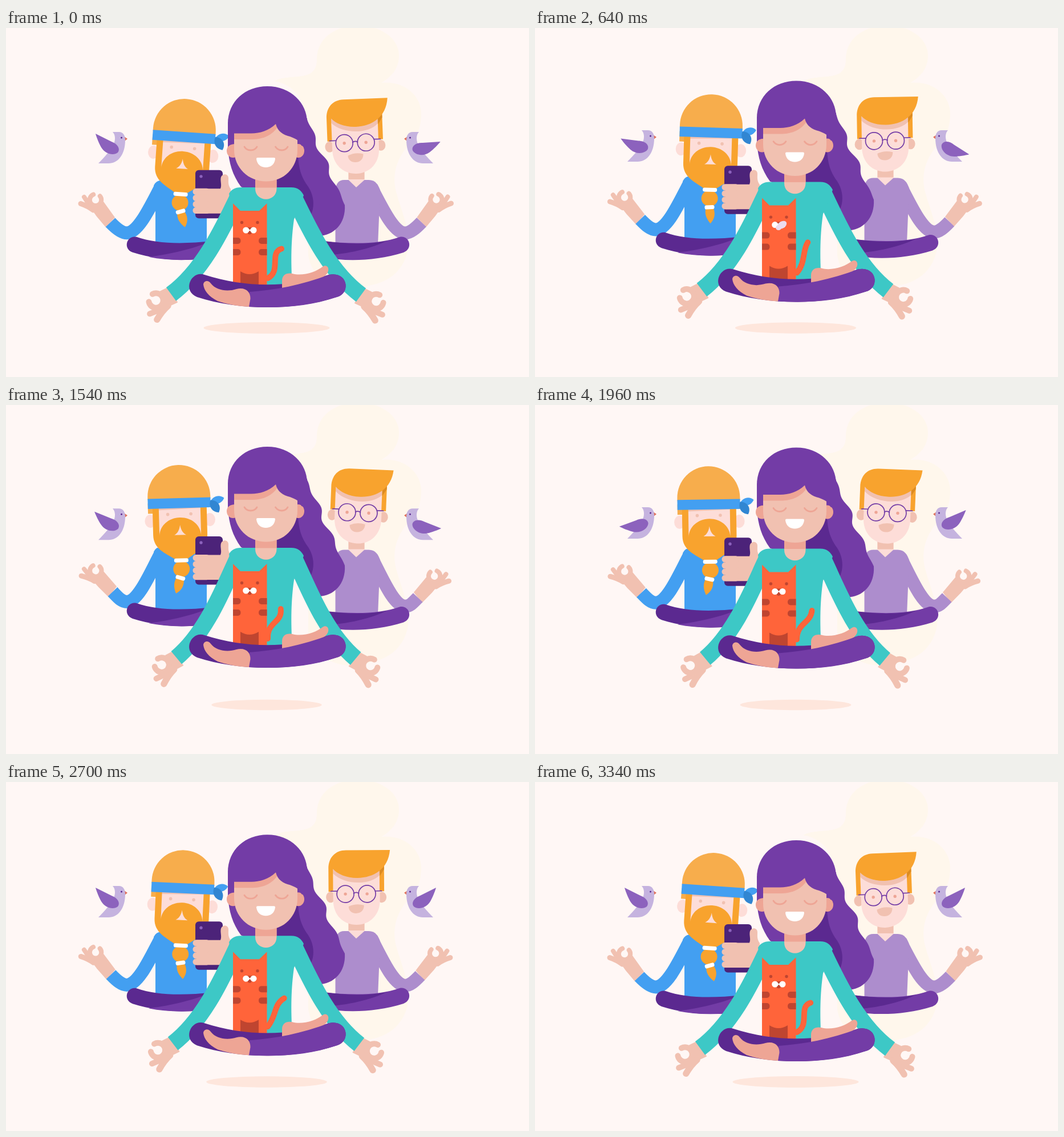
Recreate the animation shown at these times as an HTML page with a canvas. Size 917x611 px, loop 3360 ms.

```html
<!DOCTYPE html>
<html lang="en">
<head>
<meta charset="utf-8">
<title>Floating meditation</title>
<style>
  html, body { margin: 0; width: 100%; height: 100%; overflow: hidden; background: #fff7f5; }
  canvas { display: block; }
</style>
</head>
<body>
<canvas id="stage" width="917" height="611"></canvas>
<script>
const ctx = document.getElementById('stage').getContext('2d');
const LOOP = 3360, TAU = Math.PI * 2;
const C = {
  bg: '#fff7f5', cream: '#fff7ec', shadow: '#fee6dc', white: '#ffffff',
  skin: '#f1c1b1', blush: '#eea595', pale: '#fdddd8',
  purple: '#733ca6', deep: '#5b2990', phone: '#4c2379', violet: '#8c62bd',
  lilac: '#c5b3df', lavender: '#ad8dcd', teal: '#3dc8c6',
  blue: '#439ff1', navy: '#3186d2', orange: '#f8a32e', amber: '#f7ad4c', rust: '#dc8b22',
  cat: '#ff643a', brown: '#bf4530', tongue: '#ecdcee'
};

const fill = (color, d) => { ctx.fillStyle = color; ctx.fill(new Path2D(d)); };
const line = (color, width, d, cap = 'round') => {
  ctx.strokeStyle = color;
  ctx.lineWidth = width;
  ctx.lineCap = cap;
  ctx.lineJoin = 'round';
  ctx.stroke(new Path2D(d));
};
const oval = (color, x, y, rx, ry = rx, turn = 0) => {
  ctx.fillStyle = color;
  ctx.beginPath();
  ctx.ellipse(x, y, rx, ry, turn, 0, TAU);
  ctx.fill();
};
const box = (color, x, y, w, h, r = 0) => {
  ctx.fillStyle = color;
  ctx.beginPath();
  ctx.roundRect(x, y, w, h, r);
  ctx.fill();
};
const rotate = deg => ctx.rotate(deg * Math.PI / 180);
const group = draw => { ctx.save(); draw(); ctx.restore(); };
const moved = (x, y, draw) => group(() => { ctx.translate(x, y); draw(); });
const turned = (x, y, deg, draw) => group(() => {
  ctx.translate(x, y); rotate(deg); ctx.translate(-x, -y); draw();
});
const mirrored = (width, draw) => group(() => {
  ctx.translate(width, 0); ctx.scale(-1, 1); draw();
});

// 0 at the lowest point, 1 at the highest
const rise = t => (1 - Math.cos(TAU * t / LOOP)) / 2;

// Hand with thumb and index curled into a ring; reach is the length of bare forearm
function hand(cuffX, cuffY, sway, ringX, ringY, { angle = 0, scale = 1, reach = 1 } = {}) {
  group(() => {
    ctx.translate(cuffX, cuffY);
    rotate(sway);
    ctx.translate(ringX, ringY);
    rotate(angle);
    ctx.scale(scale, scale);
    fill(C.skin, `M-13 8 L2 29 L${2 + 16 * reach} ${29 + 19 * reach} L${20 + 14 * reach} ${11 + 20 * reach} L14 3 L10 5 A11 11 0 0 1 -9 6 Z`);
    line(C.skin, 8, 'M-9 12 L-20 -5');
    line(C.skin, 9, 'M-4 18 Q-13 11 -26 6.5');
    ctx.lineWidth = 8;
    ctx.beginPath();
    ctx.arc(0, 0, 10.2, -0.7, -1.95);
    ctx.stroke();
  });
}

function bird(t, lag) {
  // start, period and number of flaps
  const bursts = [[-58, 290, 4], [1189, 264, 4], [2720, 235, 2]];
  let wave = 1;
  for (const [start, period, count] of bursts) {
    const turns = (t - start - lag) / period;
    if (turns > 0 && turns < count) wave = Math.cos(TAU * turns);
  }
  const bob = t < 2640 ? -1.5 * (1 - Math.cos(TAU * t / 1320)) : 0;
  moved(0, bob, () => {
    fill('#e0705a', 'M207 190 L213 194 L208 198 Z');
    fill(C.lilac, 'M187 182 H198 C206 182 209 189 209 196 C209 222 196 237 180 237 H162 C172 227 185 213 190 200 C192 193 191 186 187 182 Z');
    oval(C.deep, 202.5, 192, 1.5);
    turned(188, 211, -32 * (1 - wave), () => {
      fill(C.violet, 'M157 185 L185 199 C196 203 201 212 196 218 C189 224 174 221 167 209 C163 202 159 192 157 185 Z');
    });
  });
}

function raisedArm(color, x, y, elbow, sway) {
  hand(x, y, sway, -26, -39.5);
  line(color, 23, `M271 279 C252 315 232 ${elbow - 1} 212 ${elbow} C203 ${elbow} ${x + 10} ${y + 10.5} ${x} ${y}`, 'butt');
}

function rightMan(t) {
  const p = rise(t - 60);
  moved(0, -13 * p, () => {
    mirrored(911.5, () => raisedArm(C.lavender, 183 + 6.5 * p, 340 + 10 * p, 359 + 6 * p, -4.5 * p));
    fill(C.lavender, 'M593 266 H636 C648 266 653 275 656 284 L652 380 H577.5 V285 C578 273 583 266 593 266 Z');
    fill(C.purple, 'M690 366 C657 378 609 379 557 373 V402 C599 409 649 408 697 393 C715 386 707 362 690 366 Z');
    fill(C.deep, 'M557 373 C600 379 640 379 668 372.5 C640 386 600 396 557 398 Z');
    fill(C.pale, 'M600.5 245 H628.5 V266 L614 279 L600.5 266 Z');
    box(C.skin, 600.5, 248, 28, 17);
    turned(614, 262, -2.2 + 4.7 * p, () => {
      oval(C.skin, 569.5, 206.5, 8, 9.5);
      oval(C.skin, 659.5, 207, 8, 9.5);
      fill(C.pale, 'M574 150 H656 V212 C656 238 638 255 615 255 C592 255 574 238 574 212 Z');
      fill(C.skin, 'M574 152 H656 V168 C640 186 595 186 574 165 Z');
      box(C.orange, 655.5, 145, 8, 51.5);
      fill(C.rust, 'M656 148 H663.5 V158 L656 170 Z');
      fill(C.orange, 'M566 197 V157 C566 137 578 124.5 597 124.5 H674 C671 158 645 173 617 173 C597 173 582 166 574 157 V197 Z');
      for (const x of [595.5, 633.5]) {
        oval(C.blush, x, 201, 2.7);
        ctx.strokeStyle = C.purple;
        ctx.lineWidth = 1.7;
        ctx.beginPath();
        ctx.arc(x, 201, 15, 0, TAU);
        ctx.stroke();
      }
      line(C.purple, 1.7, 'M610 200 Q614.5 197 619 200 M570 196 H581 M648 196 H659');
      fill(C.skin, 'M601 223 Q614 217 628 221 C628 230 622 235 614 235 C606 235 601 230 601 223 Z');
    });
  });
}

function leftMan(t) {
  const p = rise(t + 100);
  moved(0, -19 * p, () => {
    raisedArm(C.blue, 183 + 4 * p, 340.5 + 5.5 * p, 359 + 4.5 * p, -5.5 * p);
    fill(C.blue, 'M262 380 V290 L259 276 Q263 267 273 267 H340 L352 280 V380 Z');
    fill(C.deep, 'M229 366 C262 378 310 379 362 373 V402 C320 409 270 408 222 393 C204 386 212 362 229 366 Z');
    fill(C.purple, 'M250 401 C290 396 330 386 356 375 H362 V402 C325 408 285 408 250 401 Z');

    turned(307, 278, 4 - 5.6 * p, () => {
      oval(C.pale, 254.5, 221, 9.5, 11.5);
      oval(C.pale, 359, 221, 9.5, 11.5);
      box(C.amber, 251, 190, 10, 18);
      box(C.pale, 266, 196, 82, 72);
      fill(C.skin, 'M269 198 H344 V200 L269 202.5 Z');
      oval(C.skin, 285.5, 210, 2.8);
      oval(C.skin, 326, 210, 2.8);
      fill(C.orange, 'M259 198 H270 V247 C271 229 287 216 306.5 216 C326 216 342 229 343 247 V198 H354 V246 C354 270 334 277 319 288 H295 C280 278 259 270 259 246 Z');
      fill(C.pale, 'M306.5 229 C308 239 312 244 317 246.5 H296 C301 244 305 239 306.5 229 Z');
      fill(C.amber, 'M251 184 V179 A55 55 0 0 1 361 179 V184 Z');
      box(C.blue, 251, 182, 110, 17.5);
      fill(C.blue, 'M360 192 C364 179 378 177 385 184 C381 193 370 197 360 192 Z');
      fill(C.navy, 'M361 187 C373 187 381 197 375 209 C363 208 357 198 361 187 Z');
      oval(C.orange, 307, 306, 14.5, 14);
      box(C.white, 294.5, 287.5, 25, 7, 3);
    });
    turned(306, 321, -16 + 32 * p, () => {
      fill(C.orange, 'M300 321 C296 332 299 341 306 350 C315 341 316 332 312 321 Z');
      box(C.white, 297.5, 318, 17, 7, 3);
    });

    box(C.phone, 332, 249, 48, 84.5, 6);
    oval(C.violet, 342, 260, 2.7);
    fill(C.skin, 'M334 281.5 H376 C379 275 375 268 377 261 C380 254 390 255 390 263 C390 270 389 275 394 282 V325 H334 Z');
    for (let i = 0; i < 4; i++) box(C.skin, 327.5, 281 + i * 11, 30, 11.2, 5.5);
  });
}

// The right edge carries a wave that travels down one wavelength per loop
function backHair(t) {
  let edge = '';
  for (let y = 160; y <= 310; y += 3) {
    const s = (y - 160) / 150;
    const sway = Math.sin(Math.PI * s) * (1.2 - 0.5 * s);
    const wave = -1 - 5 * Math.cos(TAU * ((y - 209) / 53 - t / LOOP));
    edge += ` L${528 + 66 * s + sway * wave} ${y}`;
  }
  fill(C.purple, `M389 165 L528 158 ${edge} C596 342 575 364 547 364 C535 364 526 359 518 350 L500 315 L412 278 C397 257 391 237 389 210 Z`);
  fill(C.deep, 'M470 222 H512 C513 250 520 264 530 278 C546 303 540 334 516 348 L500 315 L470 310 Z');
}

function cat(t) {
  const cos = Math.cos(TAU * t / LOOP), sin = Math.sin(TAU * t / LOOP);
  line(C.cat, 10, `M459 438 C${470 + 13 * cos} ${417 + 9 * cos} ${473 - 12 * cos} ${402 - 9 * cos} ${483 - 5 * sin} ${386.5 - 2 * sin}`);
  fill(C.cat, 'M398 307 L411 320 H444 L457.5 307 V452 H398 Z');
  fill(C.brown, 'M411 426 Q427 436 443 426 V452 H411 Z');
  for (const y of [367, 387]) {
    box(C.brown, 398, y, 13.5, 11, [0, 5, 5, 0]);
    box(C.brown, 443, y, 14.5, 11, [5, 0, 0, 5]);
  }
  oval(C.brown, 413.5, 340.5, 2.7);
  oval(C.brown, 441, 340.5, 2.7);
  fill(C.brown, 'M421 349 H433.5 L430 356 C434 363 420 363 425 356 Z');
  oval(C.white, 420.7, 354, 5.5);
  oval(C.white, 434, 354, 5.5);
  fill(C.white, 'M423 349 L427.5 353.5 L432 349 V359 L427.5 354.5 L423 359 Z');
  if (t > 560 && t < 1120) {
    const side = Math.cos(Math.PI * Math.min(1, Math.max(0, (t - 640) / 380)));
    oval(C.tongue, 428 + 5 * side, 355 - side, 9, 6, -0.55 * side);
    if (side > 0) oval(C.tongue, 427, 359, 5, 4.5);
    else fill(C.brown, 'M421 349 H433.5 L427.5 354.5 Z');
  }
}

function womanArm(p) {
  const x = 289.5 + 9.5 * p, y = 466 + 5.5 * p;
  hand(x, y, -3.5 * p, -26.5, 11, { angle: -79, scale: 1.25, reach: 0.08 });
  line(C.teal, 29, `M408 293 C388 332 ${352 + 4 * p} ${420 + 4 * p} ${x} ${y}`, 'butt');
}

function woman(t) {
  const p = rise(t);
  moved(0, -29.5 * p, () => {
    backHair(t);
    womanArm(p);
    mirrored(912, () => moved(0, 1.5, () => womanArm(p)));
    fill(C.teal, 'M411 279 H500 C512 279 518 285 522 293 L505 335 C500 370 499 405 502 455 H398 V335 L391 290 C395 283 401 279 411 279 Z');
    fill(C.skin, 'M437 255 V281 C437 306 474.5 306 474.5 281 V255 Z');
    box(C.blush, 437, 258, 37.5, 21.5);
    oval(C.blush, 398, 215, 11, 12);
    oval(C.blush, 512.5, 215, 10.5, 12);
    fill(C.skin, 'M400 165 H511 V213 C511 245 487 268.5 456 268.5 C425 268.5 400 245 400 213 Z');
    fill(C.blush, 'M400 182 L473 165 L476 174 C464 190 448 195 430 195 H400 Z');
    fill(C.purple, 'M389 208 V168 C389 128 420 102 458 102 C500 102 528 132 528 165 V208 L518 206 C516 197 508 194 498 190 C486 187 476 181 473 168 C460 180 445 184.5 430 184.5 H400 V203 Q392 204 389 208 Z');
    line(C.blush, 2.8, 'M418 208 C423 216 435 216 440 208 M472.5 208 C478 216 489 216 494 208');
    fill(C.white, 'M441 227 H470 Q472 227 472 229 C471 239 464 244 455.5 244 C447 244 440 239 439 229 Q439 227 441 227 Z');
    cat(t);
    fill(C.deep, 'M348 432 C420 455 495 455 566 432 C600 425 605 465 580 471 C505 495 410 495 335 471 C308 460 325 424 348 432 Z');
    fill(C.blush, 'M484 458 V443 C484 432 492 428 502 430 C520 435 544 427 555 418 C562 413 568 420 564 428 C558 440 530 450 484 458 Z');
    fill(C.purple, 'M427 462 C470 459 520 450 566 432 C600 425 605 465 580 471 C530 488 480 491 426 488 Z');
    fill(C.blush, 'M346 449 C347 442 355 441 359 447 C369 460 389 462 404 457 C420 453 429 462 428.5 474 L426 488 C405 487 385 483 371 478 C355 470 347 459 346 449 Z');
  });
}

function draw(t) {
  ctx.fillStyle = C.bg;
  ctx.fillRect(0, 0, 917, 611);
  fill(C.cream, 'M470 93 C500 78 545 97 545 55 C545 18 577 -4 617 -4 C660 -4 689 20 689 48 C689 72 675 86 658 96 C700 92 728 120 728 150 C728 182 715 196 705 206 C675 240 680 275 685 290 C693 320 708 350 705 385 C700 420 675 444 640 450 C590 470 525 440 530 385 V200 C530 130 510 100 470 93 Z');
  const lift = rise(t);
  oval(C.shadow, 457, 525, 110.5 - 14 * lift, 10 - 0.8 * lift);
  bird(t, 66);
  mirrored(911, () => bird(t, 0));
  rightMan(t);
  leftMan(t);
  woman(t);
}

function tick() {
  draw(performance.now() % LOOP);
  requestAnimationFrame(tick);
}
tick();
</script>
</body>
</html>
```
